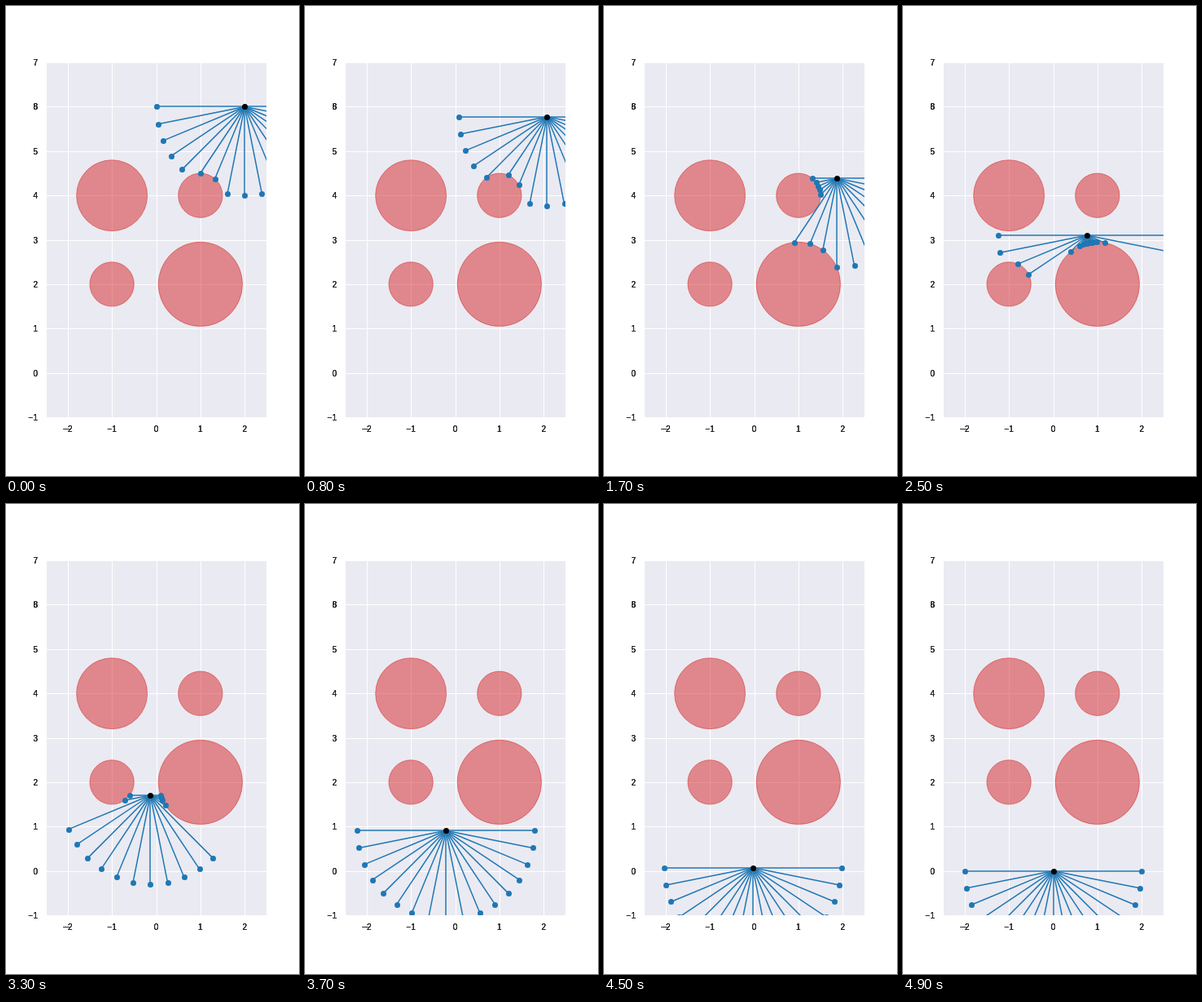
Write an HTML page with a canvas that moves like this. It is 360 px wide and 576 px high and loops after 5100 ms.

```html
<!DOCTYPE html>
<html lang="en">
<head>
<meta charset="utf-8">
<title>Range sensor among round obstacles</title>
<style>
  html, body { margin: 0; width: 100%; height: 100%; overflow: hidden; background: #fff; }
  canvas { display: block; width: 360px; height: 576px; }
</style>
</head>
<body>
<canvas id="stage"></canvas>
<script>
const W = 360, H = 576, UNIT = 54.36, X0 = 184.5, Y0 = 449.64;
const STEP = 100, LAST = 49, LOOP = 5100;
const RAYS = 16, REACH = 2 * UNIT;
const BLUE = '#1f77b4';

const px = x => X0 + x * UNIT;
const py = y => Y0 - y * UNIT;

// obstacles: x, y, radius in plot units
const obstacles = [[-1, 4, 0.8], [1, 4, 0.5], [-1, 2, 0.5], [1, 2, 0.95]]
  .map(([x, y, r]) => ({ x: px(x), y: py(y), r: r * UNIT }));

// robot path: step, x, y in pixels
const path = [
  [0, 293.22, 123.48], [3, 293.4, 124.1], [6, 294.7, 128.6], [8, 297.3, 135.8],
  [10, 299.2, 147.1], [12, 299.5, 163.1], [14, 296.9, 181.6], [16, 290.7, 200.9],
  [17, 286.3, 211.2], [18, 280.9, 221.7], [21, 259.5, 249.5], [24, 234.6, 273.1],
  [25, 226, 281], [27, 208.9, 298.3], [30, 188, 325], [33, 177.3, 357],
  [36, 173, 390], [39, 174.8, 418.6], [42, 179.4, 436], [45, 182.8, 445.85],
  [47, 184, 448.9], [48, 184.38, 449.52], [49, 184.5, 449.64]
];

const canvas = document.getElementById('stage');
const ctx = canvas.getContext('2d');
const ratio = window.devicePixelRatio || 1;
canvas.width = W * ratio;
canvas.height = H * ratio;
ctx.scale(ratio, ratio);

function slope(i, k) {
  const a = path[Math.max(i - 1, 0)];
  const b = path[Math.min(i + 1, path.length - 1)];
  return (b[k] - a[k]) / (b[0] - a[0]);
}

// cubic Hermite curve through the path points
function robotAt(n) {
  let i = 0;
  while (i < path.length - 2 && path[i + 1][0] <= n) i++;
  const a = path[i], b = path[i + 1], d = b[0] - a[0];
  const u = (n - a[0]) / d, v = 1 - u;
  const value = k =>
    a[k] * (1 + 2 * u) * v * v + b[k] * u * u * (3 - 2 * u) +
    d * u * v * (slope(i, k) * v - slope(i + 1, k) * u);
  return { x: value(1), y: value(2) };
}

// distance to the nearest obstacle edge along a ray
function range(p, dx, dy) {
  let best = REACH;
  for (const o of obstacles) {
    const ex = p.x - o.x, ey = p.y - o.y;
    const b = ex * dx + ey * dy;
    const disc = b * b - (ex * ex + ey * ey - o.r * o.r);
    if (disc < 0) continue;
    const root = Math.sqrt(disc);
    for (const t of [-b - root, -b + root]) if (t > 0 && t < best) best = t;
  }
  return best;
}

function disc(x, y, r) {
  ctx.beginPath();
  ctx.arc(x, y, r, 0, 2 * Math.PI);
  ctx.fill();
}

const marker = (x, y) => disc(Math.round(x) + 0.5, Math.round(y) + 0.5, 3.5);

function drawLabels() {
  ctx.fillStyle = '#262626';
  ctx.font = '10px Arial, "Liberation Sans", sans-serif';
  const put = (s, x, y) => {
    for (let i = 0; i < 3; i++) ctx.fillText(s, x, y);
  };
  const text = n => String(n).replace('-', '\u2212');
  ctx.textAlign = 'center';
  for (let x = -2; x <= 2; x++) put(text(x), px(x), 522);
  put('\u2212', px(-2) - 0.5, 522);
  ctx.textAlign = 'right';
  for (let y = -1; y <= 7; y++) put(text(y), 39, Math.round(py(y)) + 4);
  put('8', 39, Math.round(py(6)) + 4);
}

function drawPlot() {
  ctx.fillStyle = '#eaeaf2';
  ctx.fillRect(50, 70, 270, 434);
  ctx.fillStyle = '#fff';
  for (let x = -2; x <= 2; x++) ctx.fillRect(Math.round(px(x)), 70, 1, 434);
  for (let y = 0; y <= 6; y++) ctx.fillRect(50, Math.round(py(y)), 270, 1);
  ctx.fillStyle = ctx.strokeStyle = 'rgba(214, 39, 40, 0.5)';
  ctx.lineWidth = 1;
  for (const o of obstacles) {
    disc(o.x, o.y, o.r);
    ctx.stroke();
  }
}

function drawSensor(p) {
  ctx.fillStyle = ctx.strokeStyle = BLUE;
  ctx.lineWidth = 1.5;
  for (let i = 0; i <= RAYS; i++) {
    const angle = Math.PI * i / RAYS;
    const dx = Math.cos(angle), dy = Math.sin(angle);
    const d = range(p, dx, dy);
    const end = { x: p.x + d * dx, y: p.y + d * dy };
    // axis-aligned rays sit on whole pixels
    const flat = i % (RAYS / 2) === 0;
    const snap = v => flat ? Math.round(v) : v;
    ctx.beginPath();
    ctx.moveTo(snap(p.x), snap(p.y));
    ctx.lineTo(snap(end.x), snap(end.y));
    ctx.stroke();
    marker(end.x, end.y);
  }
  ctx.fillStyle = '#000';
  marker(p.x, p.y);
}

function draw(n) {
  ctx.fillStyle = '#fff';
  ctx.fillRect(0, 0, W, H);
  drawLabels();
  ctx.save();
  ctx.beginPath();
  ctx.rect(50, 70, 270, 434);
  ctx.clip();
  drawPlot();
  drawSensor(robotAt(n));
  ctx.restore();
}

const start = performance.now();
let shown = -1;
function tick() {
  const t = Math.max(0, performance.now() - start) % LOOP;
  const n = Math.min(LAST, Math.floor(t / STEP));
  if (n !== shown) draw(shown = n);
  requestAnimationFrame(tick);
}
tick();
</script>
</body>
</html>
```
